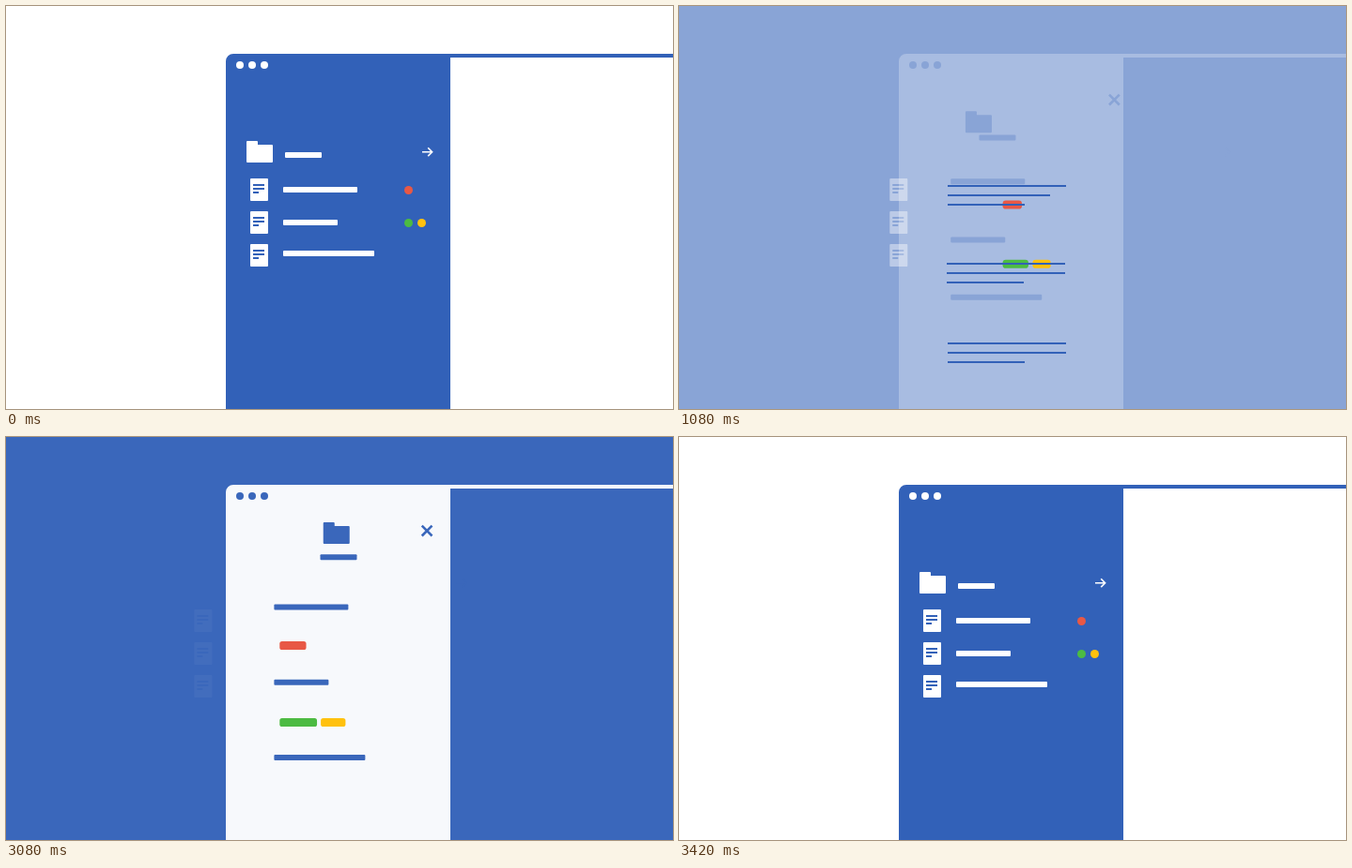
Write an HTML page that moves like this. It is 710x430 px and loops after 4.18 s.

```html
<!DOCTYPE html>
<html lang="en">
<head>
<meta charset="utf-8">
<title>Folder view transition</title>
<style>
  html, body { margin: 0; width: 100%; height: 100%; overflow: hidden; }
  svg { display: block; width: 710px; height: 430px; }
</style>
</head>
<body>
<svg id="stage" viewBox="0 0 710 430" xmlns="http://www.w3.org/2000/svg"></svg>
<script>
const LOOP = 4180, OPEN = 980, CLOSE = 3080, STEP = 20, STEPS = 18;
const BLUE = [50, 97, 184], WHITE = [255, 255, 255];
const stage = document.getElementById('stage');

function add(tag, attrs, parent = stage) {
  const el = document.createElementNS('http://www.w3.org/2000/svg', tag);
  set(el, attrs);
  return parent.appendChild(el);
}

function set(el, attrs) {
  for (const key in attrs) el.setAttribute(key, attrs[key]);
}

const mix = (a, b, k) => a + (b - a) * k;
const blend = (a, b, k) => `rgb(${a.map((v, i) => Math.round(mix(v, b[i], k)))})`;
const shift = (el, x, y) => el.setAttribute('transform', `translate(${x} ${y})`);

// cubic-bezier(0.25, 0.1, 0.25, 1)
function ease(p) {
  if (p <= 0 || p >= 1) return p <= 0 ? 0 : 1;
  let lo = 0, hi = 1;
  for (let i = 0; i < 30; i++) {
    const s = (lo + hi) / 2;
    if (0.75 * s - 0.75 * s * s + s ** 3 < p) lo = s; else hi = s;
  }
  return 0.3 * lo + 2.4 * lo ** 2 - 1.7 * lo ** 3;
}

// Backdrop, window panel and its top edge
const backdrop = add('rect', { width: 710, height: 430 });
const panel = add('path', { d: 'M234 430V59a8 8 0 0 1 8-8H710V55H473V430Z' });

// Everything in the ink group takes the backdrop colour
const ink = add('g', {});
for (const cx of [249, 262, 275]) add('circle', { cx, cy: 63, r: 4 }, ink);

const folder = add('path', {
  d: 'M1 0H11a1 1 0 0 1 1 1V4H27a1 1 0 0 1 1 1V22a1 1 0 0 1-1 1H1a1 1 0 0 1-1-1V1a1 1 0 0 1 1-1Z'
}, ink);

// Bars: width, from x, y, to x, y
const bars = [
  [39, 297, 156, 336, 124],
  [79, 295, 193, 285, 178],
  [58, 295, 228, 285, 260],
  [97, 295, 261, 285, 342]
].map(([width, ...path]) => ({ el: add('rect', { width, height: 6, rx: 1 }, ink), path }));

const arrow = add('path', { d: 'M443 155.7H453.6M449.2 151.3L453.6 155.7L449.2 160.1', fill: 'none', 'stroke-width': 1.6 }, ink);
const cross = add('path', { d: 'M441.2 94.7L452 105.5M452 94.7L441.2 105.5', fill: 'none', 'stroke-width': 2.6 }, ink);

// Tags: colour, from x, y, to x, y, final width
const tags = [
  ['#e85845', 424, 192, 286, 219, 29],
  ['#4cbb42', 424, 227, 286, 303, 41],
  ['#ffc10e', 438, 227, 331, 303, 27]
].map(([fill, ...path]) => ({ el: add('rect', { fill, height: 9 }), path }));

// Paragraph lines, always blue
const text = add('g', { fill: blend(BLUE, BLUE, 0) });
[
  [286, 191, 126, 109, 82],
  [285, 274, 126, 126, 82],
  [286, 359, 126, 126, 82]
].forEach(([x, y, ...widths]) => widths.forEach((width, i) =>
  add('rect', { x, y: y + i * 10, width, height: 2 }, text)));

// Document icons with cut-out lines
const docs = add('g', { fill: '#fff', 'fill-rule': 'evenodd' });
for (const y of [184, 219, 254]) {
  add('path', {
    d: 'M1 0H18a1 1 0 0 1 1 1V23a1 1 0 0 1-1 1H1a1 1 0 0 1-1-1V1a1 1 0 0 1 1-1Z' +
       'M3 6H15V8H3ZM3 10H15V12H3ZM3 14H9V16H3Z',
    transform: `translate(260 ${y})`
  }, docs);
}

function progress(t, start) {
  if (t < start) return 0;
  return ease(Math.min(1, (Math.floor((t - start) / STEP) + 1) / STEPS));
}

function draw(t) {
  const closing = t >= CLOSE;
  const e = closing ? 1 - progress(t, CLOSE) : progress(t, OPEN);
  const inkColor = blend(WHITE, BLUE, e);

  set(backdrop, { fill: inkColor });
  set(panel, { fill: blend(BLUE, WHITE, e) });
  set(ink, { fill: inkColor });
  set(arrow, { stroke: inkColor });
  set(cross, { stroke: inkColor });

  shift(folder, mix(256, 341, e), mix(144, 89, e));
  for (const { el, path: [x0, y0, x1, y1] } of bars) shift(el, mix(x0, x1, e), mix(y0, y1, e));
  for (const { el, path: [x0, y0, x1, y1, w] } of tags) {
    set(el, { x: mix(x0, x1, e), y: mix(y0, y1, e), width: mix(9, w, e), rx: mix(4.5, 2.5, e) });
  }

  // The arrow leaves fast and returns from just past the panel edge
  shift(arrow, e * (closing ? 38 : 230), 0);
  shift(cross, (1 - e) * 39.5, 0);

  set(text, { visibility: closing || t < OPEN ? 'hidden' : 'visible' });
  shift(docs, -62 * e, 0);
  set(docs, { opacity: 1 - e });
}

const begin = performance.now();
function tick() {
  draw((performance.now() - begin) % LOOP);
  requestAnimationFrame(tick);
}
tick();
</script>
</body>
</html>
```
